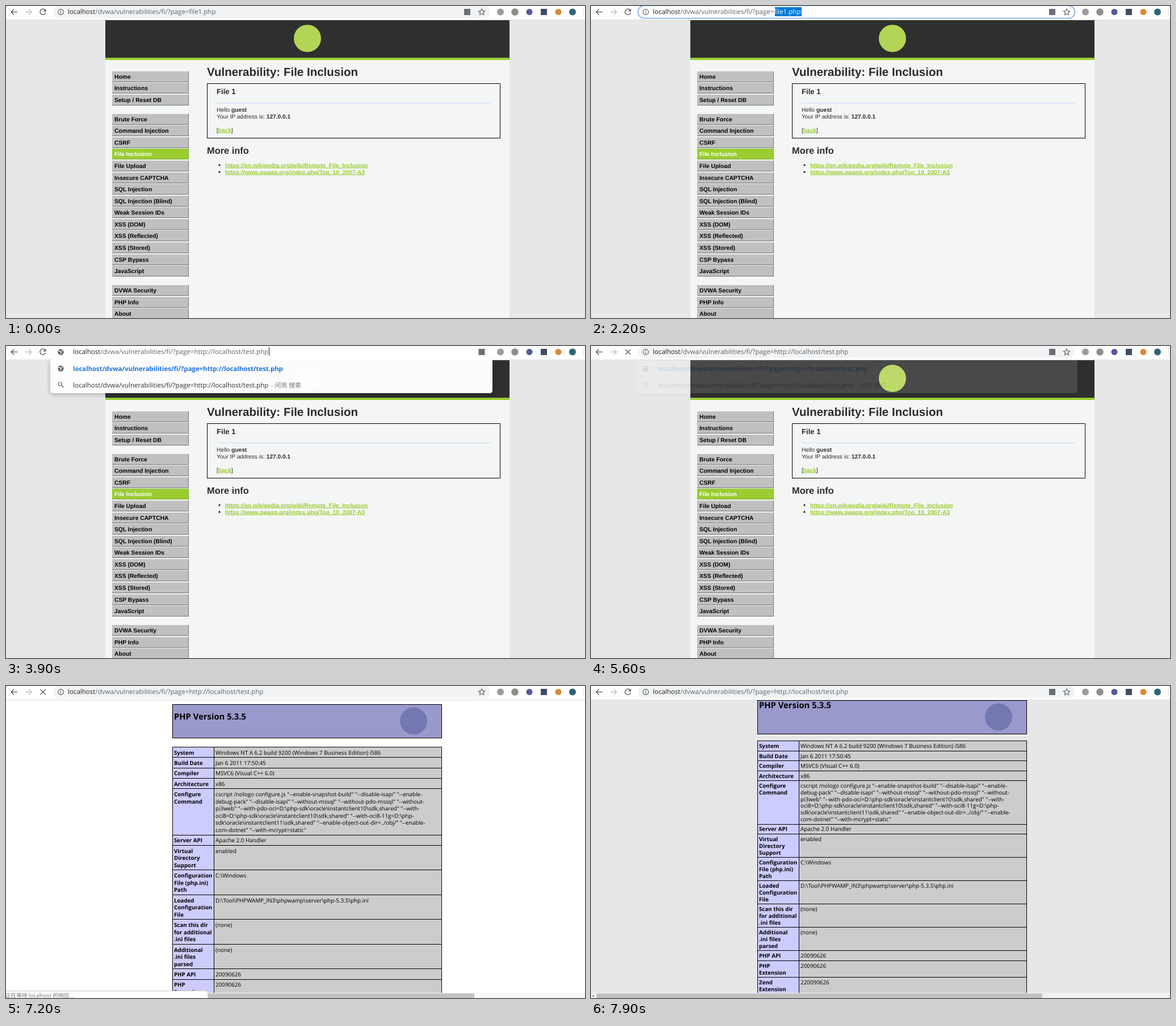
An HTML page that plays this animation: 1020x549 px, repeating every 9000 ms.

```html
<!DOCTYPE html>
<html lang="en">
<head>
<meta charset="utf-8">
<title>File inclusion demo</title>
<style>
  html, body { margin: 0; width: 100%; height: 100%; overflow: hidden; background: #e7e7e7; }
  svg { display: block; width: 100%; height: 100%; }
  text { white-space: pre; text-rendering: geometricPrecision; }
  .ui { font-family: "Open Sans", "Noto Sans", "Noto Sans CJK SC", "Noto Sans CJK", sans-serif; }
  .page { font-family: "Liberation Sans", Arial, sans-serif; }
  .b { font-weight: 700; }
  .link { fill: #9acd32; font-weight: 700; text-decoration: underline; }
  .icon { fill: none; stroke: #5f6368; stroke-width: 1.5; }
  .crisp { shape-rendering: crispEdges; }
</style>
</head>
<body>
<svg id="stage" viewBox="0 0 1020 549"></svg>
<script>
const LOOP = 9000;
const URL_SIZE = 11.56;
const PATH = '/dvwa/vulnerabilities/fi/?page=';
const OLD_PAGE = 'file1.php';
const NEW_PAGE = 'http://localhost/test.php';

// Opacity steps per part: [time in ms, opacity]
const cues = {
  dvwa: [[0, 1], [7200, 0]],
  infoA: [[0, 0], [7200, 1], [7400, 0]],
  infoB: [[0, 0], [7400, 1]],
  ring: [[0, 0], [900, 1], [2900, 0]],
  urlOld: [[0, 1], [2900, 0]],
  urlNew: [[0, 0], [5600, 1]],
  pickAll: [[0, 0], [900, 1], [1300, 0]],
  pickSome: [[0, 0], [2100, 1], [2200, 0]],
  pickFile: [[0, 0], [2200, 1], [2900, 0]],
  caretOld: [[0, 0], [1300, 1], [1800, 0]],
  caretNew: [[0, 0], [2900, 1], [3400, 0], [3900, 1], [4400, 0], [4900, 1], [5400, 0]],
  popup: [[0, 0], [2900, .985], [5600, .12], [5700, 0]],
  typing: [[0, 0], [2900, 1], [5600, 0]],
  star: [[0, 1], [2900, 0], [5600, 1]],
  lang: [[0, 1], [3000, 0], [5600, 1], [6900, .5], [7000, 0], [7500, 1]],
  langMoved: [[0, 0], [3000, 1], [5600, 0]],
  reload: [[0, 1], [5600, 0], [7500, 1]],
  stop: [[0, 0], [5600, 1], [7500, 0]],
  status: [[0, 0], [6000, 1], [7700, .66], [7800, .33], [7900, 0]],
  connecting: [[0, 1], [6200, 0]],
  waiting: [[0, 0], [6200, 1]]
};

const rect = (x, y, w, h, fill, more = '') =>
  `<rect x="${x}" y="${y}" width="${w}" height="${h}" fill="${fill}" ${more}/>`;
const text = (x, y, size, str, more = '') =>
  `<text x="${x}" y="${y}" font-size="${size}" ${more}>${str}</text>`;
const dot = (x, y, r, fill) => `<circle cx="${x}" cy="${y}" r="${r}" fill="${fill}"/>`;
const part = (id, body) => `<g id="${id}">${body}</g>`;
const bold = s => `<tspan class="b">${s}</tspan>`;

function menu() {
  const groups = [
    [123.9, ['Home', 'Instructions', 'Setup / Reset DB']],
    [199, ['Brute Force', 'Command Injection', 'CSRF', 'File Inclusion', 'File Upload',
      'Insecure CAPTCHA', 'SQL Injection', 'SQL Injection (Blind)', 'Weak Session IDs',
      'XSS (DOM)', 'XSS (Reflected)', 'XSS (Stored)', 'CSP Bypass', 'JavaScript']],
    [500.2, ['DVWA Security', 'PHP Info', 'About']]
  ];
  return groups.map(([start, items]) => items.map((name, i) => {
    const mid = start + i * 20.56;
    const top = Math.round(mid - 9.2);
    const on = name === 'File Inclusion';
    return rect(187, top, 135, 19, on ? '#84ad33' : '#707585', 'class="crisp"') +
      rect(187, top, 134, 18, on ? '#9acd32' : '#c0c0c0', 'class="crisp"') +
      text(191, mid + 3.8, 10.3, name, `class="b" fill="${on ? '#fff' : '#000'}"`);
  }).join('')).join('');
}

function dvwaPage() {
  return `<g class="page" fill="#2b2b2b">` +
    rect(0, 24, 1020, 525, '#e7e7e7') +
    rect(175, 25, 712, 524, '#f4f6f5') +
    rect(175, 25, 712, 66, '#2f2f2f') +
    rect(175, 91, 712, 4, '#9acd32') +
    dot(531, 57, 24, '#b4d455') +
    menu() +
    text(354, 123.2, 20.53, 'Vulnerability: File Inclusion', 'class="b"') +
    rect(354.5, 136.5, 516, 96, 'none', 'stroke="#000" class="crisp"') +
    text(371, 155, 13.1, 'File 1', 'class="b"') +
    rect(371, 170, 483, 1, '#c5d9fb') +
    text(371, 186, 10.2, 'Hello ' + bold('guest')) +
    text(371, 198, 10.2, 'Your IP address is: ' + bold('127.0.0.1')) +
    text(371, 221.5, 10.2, '[<tspan class="link">back</tspan>]') +
    text(354, 260, 16.4, 'More info', 'class="b"') +
    dot(376, 280, 1.7, '#2b2b2b') + dot(376, 292, 1.7, '#2b2b2b') +
    text(386, 283.5, 10.25, 'https://en.wikipedia.org/wiki/Remote_File_Inclusion', 'class="link"') +
    text(386, 295.5, 10.25, 'https://www.owasp.org/index.php/Top_10_2007-A3', 'class="link"') +
    '</g>';
}

const infoRows = [
  ['System', 'Windows NT A 6.2 build 9200 (Windows 7 Business Edition) i586'],
  ['Build Date', 'Jan 6 2011 17:50:45'],
  ['Compiler', 'MSVC6 (Visual C++ 6.0)'],
  ['Architecture', 'x86'],
  ['Configure|Command',
    'cscript /nologo configure.js "--enable-snapshot-build" "--disable-isapi" "--enable-|' +
    'debug-pack" "--disable-isapi" "--without-mssql" "--without-pdo-mssql" "--without-|' +
    'pi3web" "--with-pdo-oci=D:\\php-sdk\\oracle\\instantclient10\\sdk,shared" "--with-|' +
    'oci8=D:\\php-sdk\\oracle\\instantclient10\\sdk,shared" "--with-oci8-11g=D:\\php-|' +
    'sdk\\oracle\\instantclient11\\sdk,shared" "--enable-object-out-dir=../obj/" "--enable-|' +
    'com-dotnet" "--with-mcrypt=static"'],
  ['Server API', 'Apache 2.0 Handler'],
  ['Virtual|Directory|Support', 'enabled'],
  ['Configuration|File (php.ini)|Path', 'C:\\Windows'],
  ['Loaded|Configuration|File', 'D:\\Tool\\PHPWAMP_IN3\\phpwamp\\server\\php-5.3.5\\php.ini'],
  ['Scan this dir|for additional|.ini files', '(none)'],
  ['Additional|.ini files|parsed', '(none)'],
  ['PHP API', '20090626'],
  ['PHP|Extension', '20090626'],
  ['Zend|Extension', '220090626']
];

function infoPage({ bg, track, head, titleY, top, lead, pad, thumbEnd }) {
  const frame = 'stroke="#000" class="crisp"';
  let y = top;
  let out = rect(0, 24, 1020, 525, bg) +
    rect(293.5, head + .5, 474, 59, '#9999cc', frame) +
    text(296, titleY, 14.8, 'PHP Version 5.3.5', 'class="b"') +
    dot(718, head + 29.5, 24, '#7478b2');
  for (const row of infoRows) {
    const [keys, values] = row.map(s => s.split('|'));
    const h = pad + lead * Math.max(keys.length, values.length);
    const y0 = Math.round(y) - .5;
    const boxH = Math.round(y + h) - .5 - y0;
    const base = y + lead + .2;
    const lines = (list, x, size, more) =>
      list.map((s, i) => text(x, base + i * lead, size, s, more)).join('');
    out += rect(293.5, y0, 73, boxH, '#ccccff', frame) +
      rect(366.5, y0, 401, boxH, '#cccccc', frame) +
      lines(keys, 296, 9.75, 'class="b"') + lines(values, 369, 9.86);
    y += h;
  }
  return `<g class="ui">${out}` +
    rect(0, 540, 1020, 9, track) +
    rect(10, 541, thumbEnd - 10, 8, '#c1c1c1') +
    '<path d="M5 543v5l-3-2.5z" fill="#8a8a8a"/></g>';
}

const address = (x, page, fill) =>
  text(x, 14.3, URL_SIZE,
    `<tspan fill="${fill || '#202124'}">localhost</tspan>${PATH}${page}`,
    `class="ui" fill="${fill || '#5f6368'}"`);

// Highlighted stretch of the old address, from x to its end
const pick = (id, x) => part(id,
  `<clipPath id="${id}Clip">${rect(x, 2, 371 - x, 16, '#000')}</clipPath>
   <g clip-path="url(#${id}Clip)">${rect(x, 2, 371 - x, 16, '#0078d7')}${address(109, OLD_PAGE, '#fff')}</g>`);

const globe = y => dot(96.5, y, 5.2, '#5f6368') +
  `<path d="M92.5 ${y - 2}l4 1 1 2-2 2M98 ${y - 4}l2 3" fill="none" stroke="#fff" stroke-width="1.3"/>`;

function toolbar() {
  return rect(0, 0, 1020, 24, '#fff') + rect(0, 24, 1020, 1, '#d9dbde') +
    '<path class="icon" d="M20 10.5H9.500M14 5.500l-5 5 5 5"/>' +
    '<path class="icon" style="stroke:#bdc1c6" d="M34 10.500h10.500M40 5.500l5 5-5 5"/>' +
    part('reload', '<path class="icon" d="M69 7.200a5 5 0 1 0 .8 4.500"/><path d="M70.500 4.800v5h-5z" fill="#5f6368"/>') +
    part('stop', '<path class="icon" d="M60.500 6l9 9M69.500 6l-9 9"/>') +
    rect(83, -1, 769, 22, '#f1f3f4', 'rx="11"') +
    part('ring', rect(82.5, -.5, 770, 22, '#fff', 'rx="11" stroke="#76a7f0" stroke-width="1.500"')) +
    '<circle class="icon" style="stroke-width:1.1" cx="96.500" cy="10.500" r="4.900"/>' +
    '<path class="icon" style="stroke-width:1.2" d="M96.500 7.500v1.400M96.500 10v3.500"/>' +
    part('urlOld', address(109, OLD_PAGE)) +
    part('urlNew', address(109, NEW_PAGE)) +
    pick('pickAll', 109) + pick('pickSome', 346) + pick('pickFile', 324) +
    part('caretOld', rect(370, 2, 1, 15, '#202124')) +
    part('star', '<path class="icon" style="stroke-width:1.2" d="M838 5.200l1.600 3.600 3.900.4-2.900 2.600.8 3.800-3.400-2-3.400 2 .8-3.800-2.900-2.600 3.900-.4z"/>') +
    dot(871, 10.5, 6, '#9b9b9b') + dot(896.5, 10.5, 6.3, '#8d8d8d') +
    dot(922, 10.5, 5.5, '#55589b') + rect(942, 5, 11, 11, '#3f4c63') +
    dot(973, 10.5, 5.5, '#d98a35') + dot(998, 10.5, 6, '#2c6577') +
    rect(1017, 4, 1, 13, '#dadce0');
}

function popup() {
  const full = 'localhost' + PATH + NEW_PAGE;
  return part('popup',
    `<g class="ui"><path d="M78 25H857V78q0 5-5 5H83q-5 0-5-5z" fill="#fff" style="filter:drop-shadow(0 2px 4px #0004)"/>` +
    globe(39.5) +
    text(118, 43.6, 11.35, full, 'class="b" fill="#1a73e8"') +
    '<circle class="icon" style="stroke-width:1.2" cx="95.500" cy="67" r="3"/>' +
    '<path class="icon" d="M98 69.500l3.500 3.500"/>' +
    text(118, 72.8, URL_SIZE, full, 'fill="#303236"') +
    text(467, 72.8, 11, '- 问岚 搜索', 'fill="#70757a"') + '</g>') +
    part('typing',
      rect(78, -8, 779, 34, '#fff', 'rx="5"') + globe(10.5) + address(118, NEW_PAGE) +
      part('caretNew', rect(463, 2, 1, 15, '#202124')));
}

const langIcon = x => rect(x - 5.5, 5, 11, 11, '#6b6f75');

const stage = document.getElementById('stage');
stage.innerHTML =
  part('dvwa', dvwaPage()) +
  part('infoA', infoPage({ bg: '#fff', track: '#f8f8f8', head: 32, titleY: 59.3, top: 108, lead: 12.6, pad: 5.7, thumbEnd: 825 })) +
  part('infoB', infoPage({ bg: '#e7e7e7', track: '#f1f1f1', head: 25, titleY: 39.3, top: 97, lead: 11.75, pad: 5.8, thumbEnd: 795 })) +
  toolbar() + popup() +
  part('lang', langIcon(812.5)) + part('langMoved', langIcon(838)) +
  part('status',
    '<path d="M-1 536.500H352q3.500 0 3.500 3.500V550H-1z" fill="#fff" stroke="#c8c8c8"/><g class="ui" fill="#70757a">' +
    part('connecting', text(-1, 548, 9.6, '正在连接...')) +
    part('waiting', text(-1, 548, 9.6, '正在等待 localhost 的响应...')) + '</g>');

const tracks = Object.entries(cues).map(([id, steps]) => [document.getElementById(id), steps]);

function draw(now) {
  const t = now % LOOP;
  for (const [el, steps] of tracks) {
    let value = 0;
    for (const [at, opacity] of steps) if (t >= at) value = opacity;
    el.style.opacity = value;
  }
}

const start = performance.now();
function tick() {
  draw(performance.now() - start);
  requestAnimationFrame(tick);
}
tick();
</script>
</body>
</html>
```
